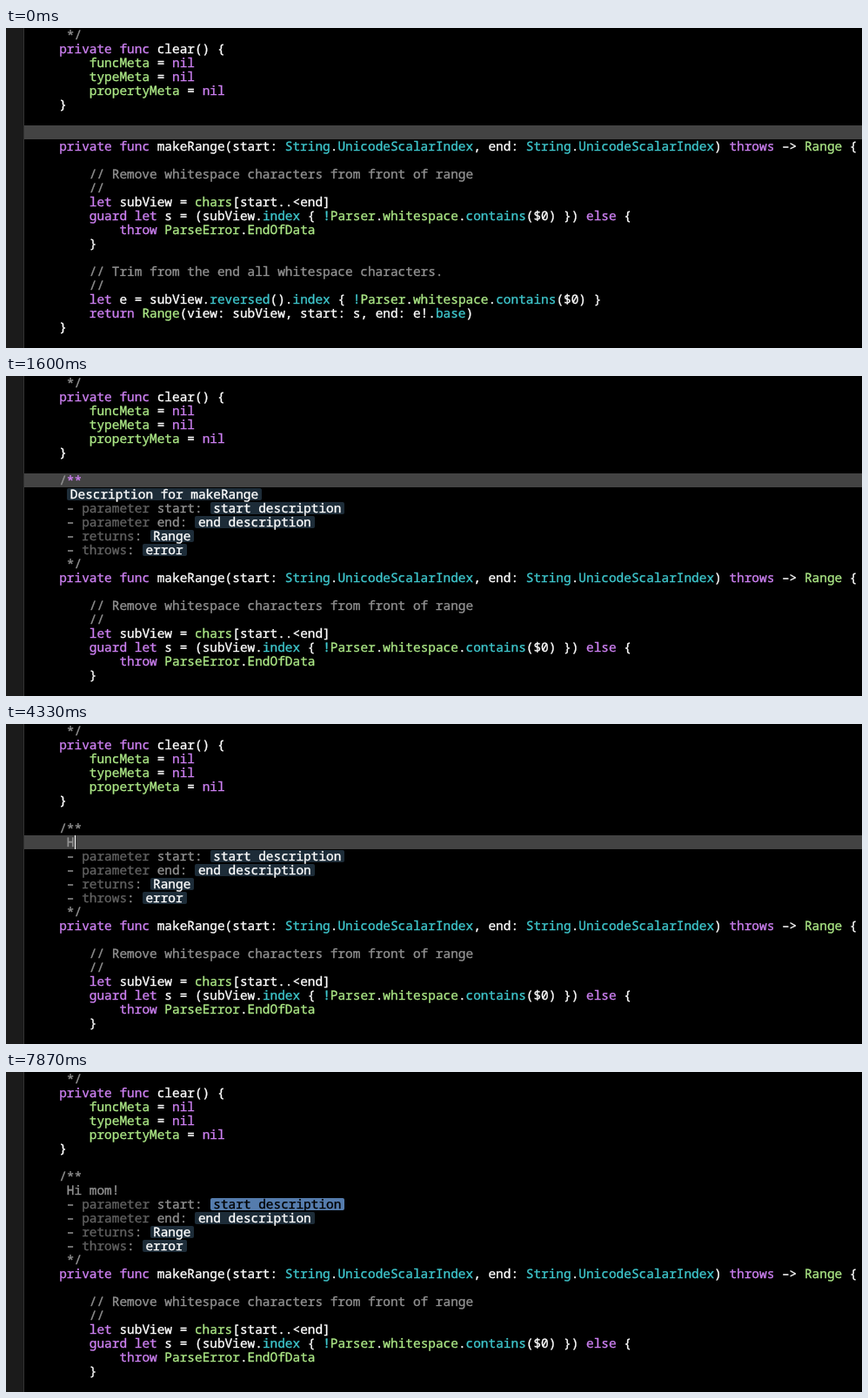
Animation of 984x368 px, one loop 8 s. Source, as an HTML page:

```html
<!DOCTYPE html>
<html lang="en">
<head>
<meta charset="utf-8">
<title>Code editor</title>
<style>
html, body { margin: 0; width: 100%; height: 100%; overflow: hidden; background: #000; }
#stage { position: relative; width: 984px; height: 368px; overflow: hidden; background: #000; }
#stage > * { position: absolute; }
#gutter { left: 0; top: 0; width: 20px; height: 368px; background: #1b1b1b; border-right: 1px solid #333; }
#band { left: 21px; right: 0; height: 16px; background: #434343; }
#caret { width: 1px; height: 16px; background: #fff; }
.code {
  left: 61.2px; margin-top: 1px; color: #fff; white-space: pre;
  font: 500 14.43px/16px "Noto Sans Mono", "DejaVu Sans Mono", monospace;
  -webkit-text-stroke: .35px;
  text-rendering: geometricPrecision; font-variant-ligatures: none;
}
.code div { height: 16px; }
.key { color: #cd80f2; }
.own { color: #ace886; }
.lib { color: #3fc8ce; }
.note { color: #929292; }
.dim { color: #626262; }
.token {
  display: inline-block; height: 14px; line-height: 15px; margin-left: .5px; padding: 0 4px 0 3.5px;
  border-radius: 2px; background: #1d2c38; color: #fff; vertical-align: top;
}
.token.on { background: #557cad; color: #000; }
</style>
</head>
<body>
<div id="stage">
  <div id="gutter"></div>
  <div id="band"></div>
  <div class="code" id="head" style="top:0"></div>
  <div class="code note" id="doc" style="top:112px"></div>
  <div class="code" id="body"></div>
  <div id="caret"></div>
</div>
<script>
const $ = id => document.getElementById(id);
const ROW = 16, COL = 8.66, LEFT = 61.2, LOOP = 8000;

const kinds = {
  key: 'private func nil throws let guard else throw return',
  own: 'funcMeta typeMeta propertyMeta chars Parser whitespace ParseError EndOfData Range',
  lib: 'String UnicodeScalarIndex index contains reversed base !'
};
const kindOf = {};
for (const kind in kinds) for (const word of kinds[kind].split(' ')) kindOf[word] = kind;

const span = (kind, text) => `<span class="${kind}">${text}</span>`;
const escape = s => s.replace(/&/g, '&amp;').replace(/</g, '&lt;').replace(/>/g, '&gt;');
const paint = line => /^\s*(\/\/|\*\/)/.test(line)
  ? span('note', line)
  : line.split(/(\w+|!(?=\w))/).map(w => kindOf[w] ? span(kindOf[w], w) : escape(w)).join('');
const fill = (id, lines) => $(id).innerHTML = lines.map(l => `<div>${l}</div>`).join('');

fill('head', [
  ' */',
  'private func clear() {',
  '    funcMeta = nil',
  '    typeMeta = nil',
  '    propertyMeta = nil',
  '}'
].map(paint));

fill('body', [
  'private func makeRange(start: String.UnicodeScalarIndex, end: String.UnicodeScalarIndex) throws –> Range {',
  '',
  '    // Remove whitespace characters from front of range',
  '    //',
  '    let subView = chars[start..<end]',
  '    guard let s = (subView.index { !Parser.whitespace.contains($0) }) else {',
  '        throw ParseError.EndOfData',
  '    }',
  '',
  '    // Trim from the end all whitespace characters.',
  '    //',
  '    let e = subView.reversed().index { !Parser.whitespace.contains($0) }',
  '    return Range(view: subView, start: s, end: e!.base)',
  '}'
].map(paint));

// {braces} mark placeholder tokens
fill('doc', [
  '/<span id="stars">**</span>',
  ' <span id="typed"></span>{Description for makeRange}',
  ' – parameter start: {start description}',
  ' – parameter end: {end description}',
  ' – returns: {Range}',
  ' – throws: {error}',
  ' */'
].map(l => l
  .replace(/\b(parameter|returns|throws)\b/, span('dim', '$1'))
  .replace(/\{(.+)\}/, span('token', '$1'))));

const [summary, startToken] = document.querySelectorAll('.token');
const insertAt = 1000, recolorAt = 1670, selectAt = 2670, nextAt = 6730;
const message = 'Hi mom!';
const keyTimes = [4270, 4730, 5000, 5270, 5400, 5530, 5670];

const blink = age => age >= 0 && age % 1060 < 530;
const show = (el, on) => el.style.visibility = on ? 'visible' : 'hidden';

function draw(t) {
  const inserted = t >= insertAt;
  const count = keyTimes.filter(k => t >= k).length;
  const lastKey = count ? keyTimes[count - 1] : inserted ? insertAt : 180;
  const selecting = t >= selectAt && !count || t >= nextAt;

  show($('doc'), inserted);
  $('body').style.top = (inserted ? 14 : 8) * ROW + 'px';
  $('stars').className = t < recolorAt ? 'key' : 'note';

  $('typed').textContent = message.slice(0, count);
  summary.style.display = count ? 'none' : '';
  summary.classList.toggle('on', t >= selectAt);
  startToken.classList.toggle('on', t >= nextAt);

  const top = (count ? 8 : 7) * ROW + 'px';
  $('band').style.top = $('caret').style.top = top;
  $('caret').style.left = Math.round(LEFT + (count ? count + 1 : 0) * COL) + 'px';
  show($('band'), !selecting);
  show($('caret'), !selecting && blink(t - lastKey));
}

const began = performance.now();
function tick() {
  draw((performance.now() - began) % LOOP);
  requestAnimationFrame(tick);
}
draw(0);
requestAnimationFrame(tick);
</script>
</body>
</html>
```
